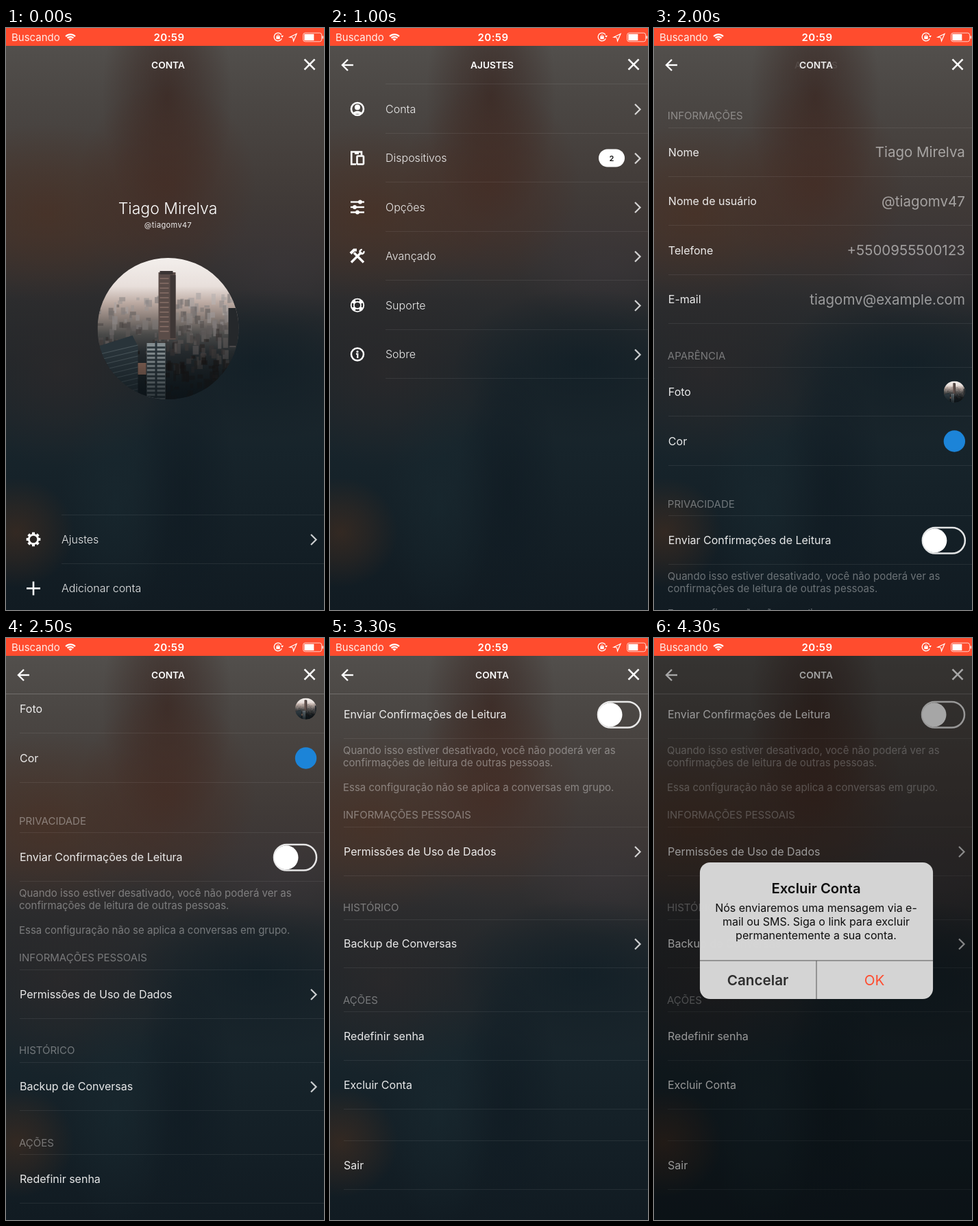
These frames come from a looping animation (464 px wide and 848 px high, 4400 ms). An HTML page with a canvas:

```html
<!DOCTYPE html>
<html lang="pt">
<head>
<meta charset="utf-8">
<style>
html, body { margin: 0; width: 100%; height: 100%; overflow: hidden; background: #10191f; }
canvas { display: block; }
</style>
</head>
<body>
<canvas id="stage" width="464" height="848"></canvas>
<script>
const W = 464, H = 848, LOOP = 4400, STEP = 100, HEADER = 82;
const RED = '#ff4c2e';
const PERSON = { name: 'Tiago Mirelva', user: '@tiagomv47', phone: '+5500955500123', mail: 'tiagomv@example.com' };
const ctx = document.getElementById('stage').getContext('2d');

const clamp = v => Math.max(0, Math.min(1, v));
const progress = (t, start, length) => clamp((t - start) / length);
const expoOut = p => p >= 1 ? 1 : 1 - 2 ** (-10 * p);
const white = a => `rgba(255,255,255,${a})`;

// y is the middle of the capital letters
function text(str, x, y, size, { weight = 400, color = white(.9), align = 'left', spacing = 0 } = {}) {
  ctx.font = `${weight} ${size}px Inter, sans-serif`;
  ctx.letterSpacing = spacing + 'px';
  ctx.textAlign = align;
  ctx.fillStyle = color;
  ctx.fillText(str, x, y + size * .364);
}

function line(points, width = 2, color = '#fff') {
  ctx.beginPath();
  points.forEach(([x, y]) => ctx.lineTo(x, y));
  ctx.lineWidth = width;
  ctx.strokeStyle = color;
  ctx.stroke();
}

function disc(x, y, r, color = '#fff') {
  ctx.beginPath();
  ctx.arc(x, y, r, 0, 7);
  ctx.fillStyle = color;
  ctx.fill();
}

function ring(x, y, r, width = 2, color = '#fff', from = 0, to = Math.PI * 2) {
  ctx.beginPath();
  ctx.arc(x, y, r, from, to);
  ctx.lineWidth = width;
  ctx.strokeStyle = color;
  ctx.stroke();
}

function box(x, y, w, h, r) {
  ctx.beginPath();
  ctx.roundRect(x, y, w, h, r);
}

function group(x, y, draw) {
  ctx.save();
  ctx.translate(x, y);
  draw();
  ctx.restore();
}

const separator = (y, x = 20, alpha = .075) => {
  ctx.fillStyle = white(alpha);
  ctx.fillRect(x, Math.floor(y), W - x, 1);
};
const chevron = y => line([[445, y - 7], [452.5, y + .5], [445, y + 8]], 2.2, white(.78));

function makeBackdrop() {
  const layer = document.createElement('canvas');
  layer.width = W;
  layer.height = H;
  const g = layer.getContext('2d');
  const sky = g.createLinearGradient(0, 0, 0, H);
  [[.03, '#524f4c'], [.12, '#4b4744'], [.24, '#443e3b'], [.36, '#3c3634'], [.47, '#2b2c2e'],
   [.58, '#1e262b'], [.72, '#17242b'], [1, '#111b22']].forEach(s => sky.addColorStop(...s));
  g.fillStyle = sky;
  g.fillRect(0, 0, W, H);
  const glow = (x, y, rx, ry, rgb, alpha) => {
    g.save();
    g.translate(x, y);
    g.scale(rx, ry);
    const fade = g.createRadialGradient(0, 0, 0, 0, 0, 1);
    fade.addColorStop(0, `rgba(${rgb},${alpha})`);
    fade.addColorStop(.5, `rgba(${rgb},${alpha * .55})`);
    fade.addColorStop(1, `rgba(${rgb},0)`);
    g.fillStyle = fade;
    g.fillRect(-1, -1, 2, 2);
    g.restore();
  };
  glow(235, 100, 95, 190, '56,38,33', .75);
  glow(60, 270, 190, 130, '76,47,32', .6);
  glow(235, 230, 130, 150, '70,42,32', .6);
  glow(400, 345, 130, 90, '60,56,60', .5);
  glow(80, 500, 180, 140, '48,42,42', .6);
  glow(370, 490, 190, 110, '16,30,38', .75);
  glow(15, 735, 85, 80, '82,50,30', .5);
  glow(260, 680, 75, 200, '15,26,34', .6);
  glow(160, 690, 80, 170, '26,43,50', .5);
  return layer;
}
const backdrop = makeBackdrop();

function cityPhoto(x, y, r) {
  group(x, y, () => {
    ctx.scale(r / 103, r / 103);
    ctx.beginPath();
    ctx.arc(0, 0, 103, 0, 7);
    ctx.clip();
    const haze = ctx.createLinearGradient(0, -103, 0, 103);
    [[0, '#f3efec'], [.2, '#e8dfdb'], [.32, '#bba9a1'], [.42, '#8b7f79'], [.54, '#4a4a49'], [.66, '#262b2e'], [1, '#0d1418']]
      .forEach(s => haze.addColorStop(...s));
    ctx.fillStyle = haze;
    ctx.fillRect(-103, -103, 206, 206);
    let seed = 7;
    const rnd = () => (seed = seed * 16807 % 2147483647) / 2147483647;
    const count = 340;
    for (let i = 0; i < count; i++) {
      const depth = i / count, top = -54 + depth * 145;
      const shade = Math.max(18, 150 - depth * 190 + rnd() * 70 - 35);
      ctx.fillStyle = `rgba(${shade + 6},${shade + 1},${shade},.6)`;
      ctx.fillRect(-103 + rnd() * 206, top + rnd() * 12, 3 + rnd() * 6, 3 + rnd() * 14);
    }
    const block = (bx, by, w, h, color) => { ctx.fillStyle = color; ctx.fillRect(bx, by, w, h); };
    block(-14, -82, 25, 98, '#5a4c48');
    block(-12, -84, 19, 5, '#3b3534');
    block(3, -78, 8, 92, '#3e3736');
    for (let i = 0; i < 12; i++) block(-12, -74 + i * 7, 13, 2, '#7c665f');
    block(88, -30, 15, 55, '#25282b');
    ctx.beginPath();
    [[-103, 26], [-52, 10], [-44, 26], [-44, 103], [-103, 103]].forEach(p => ctx.lineTo(...p));
    ctx.fillStyle = '#29343a';
    ctx.fill();
    for (let i = 0; i < 10; i++) line([[-103, 38 + i * 8], [-44, 24 + i * 8]], 1.2, '#4b575c');
    block(-31, 21, 27, 82, '#848d90');
    for (let i = 0; i < 14; i++) block(-31, 26 + i * 6, 27, 3, '#343e43');
    block(-19, 18, 3, 85, '#2a343a');
    block(-44, 50, 12, 17, '#8d6757');
    const shadow = ctx.createLinearGradient(0, 30, 0, 103);
    shadow.addColorStop(0, 'rgba(12,20,25,0)');
    shadow.addColorStop(1, 'rgba(12,20,25,.75)');
    ctx.fillStyle = shadow;
    ctx.fillRect(-103, 30, 206, 73);
  });
}

const icons = {
  gear() {
    ring(0, 0, 6.7, 2.8);
    for (let i = 0; i < 8; i++) {
      const a = i * Math.PI / 4, c = Math.cos(a), s = Math.sin(a);
      line([[c * 7, s * 7], [c * 10.3, s * 10.3]], 4);
    }
  },
  plus() {
    line([[-10, 0], [10, 0]], 2.6);
    line([[0, -10], [0, 10]], 2.6);
  },
  account() {
    ring(0, 0, 9, 2.6);
    disc(0, -2.4, 4);
    ctx.beginPath();
    ctx.ellipse(0, 7, 6.5, 4, 0, Math.PI, 0);
    ctx.fill();
  },
  devices() {
    line([[-2, 9], [-8.7, 9], [-8.7, -9], [6, -9], [6, -4]], 2.6);
    line([[-4, -7], [2, -7]], 3);
    box(-.5, -3, 9.5, 12, 1);
    ctx.lineWidth = 2.6;
    ctx.stroke();
  },
  options() {
    [[-7.5, 4], [0, -4], [7.5, 0]].forEach(([y, knob]) => {
      line([[-10, y], [10, y]], 2.4);
      disc(knob, y, 2.9);
    });
  },
  tools() {
    line([[-5, -5], [9, 9]], 3.4);
    line([[-9, 9], [6, -6]], 3.4);
    line([[-10, -4], [-5, -9], [-1, -9]], 4);
    ring(6.5, -6.5, 3, 2.4, '#fff', -.3, 4.8);
  },
  support() {
    ring(0, 0, 9.3, 1.8);
    ring(0, 0, 5, 1.8);
    for (let i = 0; i < 4; i++) ring(0, 0, 7.2, 4.5, '#fff', i * Math.PI / 2 + .4, i * Math.PI / 2 + 1.17);
  },
  about() {
    ring(0, 0, 9, 2.5);
    disc(0, -4, 1.6);
    line([[-2, -.7], [.3, -.7], [.3, 5.5]], 2.2);
  }
};

function menuRow(label, icon, y, arrow = true) {
  group(40, y, icons[icon]);
  text(label, 81, y, 16, { weight: 300 });
  if (arrow) chevron(y);
}

function profilePage() {
  text(PERSON.name, 236, 263, 23, { weight: 300, align: 'center', color: '#fff' });
  text(PERSON.user, 236.5, 287, 11, { align: 'center', spacing: .4 });
  cityPhoto(236.5, 438, 103);
  separator(709, 81);
  menuRow('Ajustes', 'gear', 745);
  separator(780, 81);
  menuRow('Adicionar conta', 'plus', 816.5, false);
}

function settingsPage() {
  const rows = [['Conta', 'account'], ['Dispositivos', 'devices'], ['Opções', 'options'],
                ['Avançado', 'tools'], ['Suporte', 'support'], ['Sobre', 'about']];
  rows.forEach(([label, icon], i) => {
    separator(81.5 + i * 71.5, 81);
    menuRow(label, icon, 118 + i * 71.5);
  });
  separator(510, 81);
  box(392, 176.5, 38, 26, 13);
  ctx.fillStyle = '#fff';
  ctx.fill();
  text('2', 411, 189.5, 11, { weight: 600, align: 'center', color: '#111' });
}

function toggle(y) {
  box(391, y - 18, 62, 37.5, 18.7);
  ctx.lineWidth = 2.5;
  ctx.strokeStyle = white(.88);
  ctx.stroke();
  disc(409, y + .8, 17.5);
}

function accountPage(scroll) {
  ctx.save();
  ctx.beginPath();
  ctx.rect(0, HEADER, W, H - HEADER);
  ctx.clip();
  ctx.translate(0, -scroll);
  const note = { color: white(.38) };
  const section = (label, y) => {
    text(label, 19, y, 15, note);
    separator(y + 17);
  };
  const row = (label, y, value) => {
    text(label, 20, y, 16);
    if (value) text(value, 453, y, 20.5, { align: 'right', color: white(.53) });
    separator(y + 35);
  };
  section('INFORMAÇÕES', 128);
  row('Nome', 181, PERSON.name);
  row('Nome de usuário', 252.5, PERSON.user);
  row('Telefone', 324, PERSON.phone);
  row('E-mail', 395.5, PERSON.mail);
  section('APARÊNCIA', 477.5);
  row('Foto', 530.5);
  cityPhoto(437.5, 530, 15.5);
  row('Cor', 602);
  disc(437.5, 602, 15.7, '#1c84d8');
  section('PRIVACIDADE', 693.5);
  row('Enviar Confirmações de Leitura', 746);
  toggle(746);
  text('Quando isso estiver desativado, você não poderá ver as', 19, 799, 15, note);
  text('confirmações de leitura de outras pessoas.', 19, 817, 15, note);
  text('Essa configuração não se aplica a conversas em grupo.', 19, 853, 15, note);
  section('INFORMAÇÕES PESSOAIS', 893);
  row('Permissões de Uso de Dados', 946);
  chevron(946);
  section('HISTÓRICO', 1028);
  row('Backup de Conversas', 1080.5);
  chevron(1080.5);
  section('AÇÕES', 1162.5);
  row('Redefinir senha', 1215);
  row('Excluir Conta', 1286.5);
  separator(1367.5);
  row('Sair', 1403);
  ctx.restore();
  if (scroll > 0) separator(81, 0, .2);
}

function header(toSettings, toAccount) {
  const title = (label, alpha) =>
    alpha > 0 && text(label, 236.5, 54, 13.7, { weight: 600, align: 'center', color: white(alpha) });
  title('CONTA', 1 - toSettings);
  title('AJUSTES', toSettings * (1 - toAccount));
  title('CONTA', toAccount);
  line([[435.5, 45.7], [450.5, 60.7]], 2.6);
  line([[450.5, 45.7], [435.5, 60.7]], 2.6);
  if (toSettings > 0) {
    ctx.globalAlpha = toSettings;
    line([[18, 54], [34, 54]], 2.4);
    line([[26, 46], [18, 54], [26, 62]], 2.4);
    ctx.globalAlpha = 1;
  }
}

function statusBar() {
  ctx.fillStyle = RED;
  ctx.fillRect(0, 0, W, 26);
  text('Buscando', 8, 13.5, 15, { color: white(.9) });
  text('20:59', 238, 13.5, 15, { weight: 600, align: 'center', color: '#fff', spacing: .4 });
  [9.7, 6.2, 2].forEach(r => ring(94, 19, r, r === 2 ? 3.6 : 2.2, '#fff', -2.36, -.78));
  ring(397, 13, 5.8, 1.3, '#fff', .4, 5.7);
  ctx.fillStyle = '#fff';
  ctx.fillRect(394.3, 12, 5.4, 4.2);
  ring(397, 11.8, 1.7, 1, '#fff', Math.PI, 0);
  ctx.beginPath();
  [[401, 11], [405, 11], [403, 14]].forEach(p => ctx.lineTo(...p));
  ctx.fill();
  line([[414, 13.5], [424, 8.5], [419.5, 19], [418.5, 14], [414, 13.5], [424, 8.5]], 1.2);
  box(433.6, 7.2, 27, 12.6, 3);
  ctx.lineWidth = 1;
  ctx.strokeStyle = white(.75);
  ctx.stroke();
  ctx.fillStyle = '#fff';
  ctx.fillRect(435.3, 8.8, 14, 9.4);
  ctx.fillRect(461.6, 11.5, 1.4, 4);
}

function alertBox(t) {
  const rest = Math.exp(-(t - 3790) / 204), shown = 1 - rest;
  ctx.fillStyle = `rgba(0,0,0,${.38 * shown})`;
  ctx.fillRect(0, 26, W, H - 26);
  group(237, 426.5, () => {
    const scale = (1 + .2 * rest) / 1.016;
    ctx.scale(scale, scale);
    ctx.translate(-237, -426.5);
    ctx.globalAlpha = clamp(shown * 1.08);
    box(67, 327, 340, 199, 15);
    ctx.fillStyle = '#d6d6d6';
    ctx.fill();
    const centered = (str, x, y, size, weight, color = '#0c0c0c') =>
      text(str, x, y, size, { weight, color, align: 'center' });
    centered('Excluir Conta', 236.5, 365, 20.3, 600);
    centered('Nós enviaremos uma mensagem via e-', 236.5, 393, 16, 400);
    centered('mail ou SMS. Siga o link para excluir', 236.5, 413, 16, 400);
    centered('permanentemente a sua conta.', 236.5, 433.5, 16, 400);
    ctx.fillStyle = '#555';
    ctx.fillRect(67, 469.5, 340, 1);
    ctx.fillRect(236.5, 470, 1, 56);
    centered('Cancelar', 151.5, 498.5, 20.7, 600, '#2c2c2c');
    centered('OK', 321.5, 498.5, 20.7, 400, RED);
  });
}

function render(t) {
  const toSettings = progress(t, 450, 550), toAccount = progress(t, 1500, 550);
  const first = expoOut(toSettings), second = expoOut(toAccount);
  const scroll = Math.round(635 * (1 - (1 - progress(t, 2100, 1000)) ** 2.185));
  ctx.drawImage(backdrop, 0, 0);
  if (first < 1) group(-W * first, 0, profilePage);
  if (first > 0 && second < 1) group(W * (1 - first - second), 0, settingsPage);
  if (second > 0) group(W * (1 - second), 0, () => accountPage(scroll));
  header(toSettings, toAccount);
  if (t >= 3800) alertBox(t);
  statusBar();
}

function frame() {
  const t = performance.now() % LOOP;
  render(Math.floor(t / STEP) * STEP);
  requestAnimationFrame(frame);
}
frame();
</script>
</body>
</html>
```
